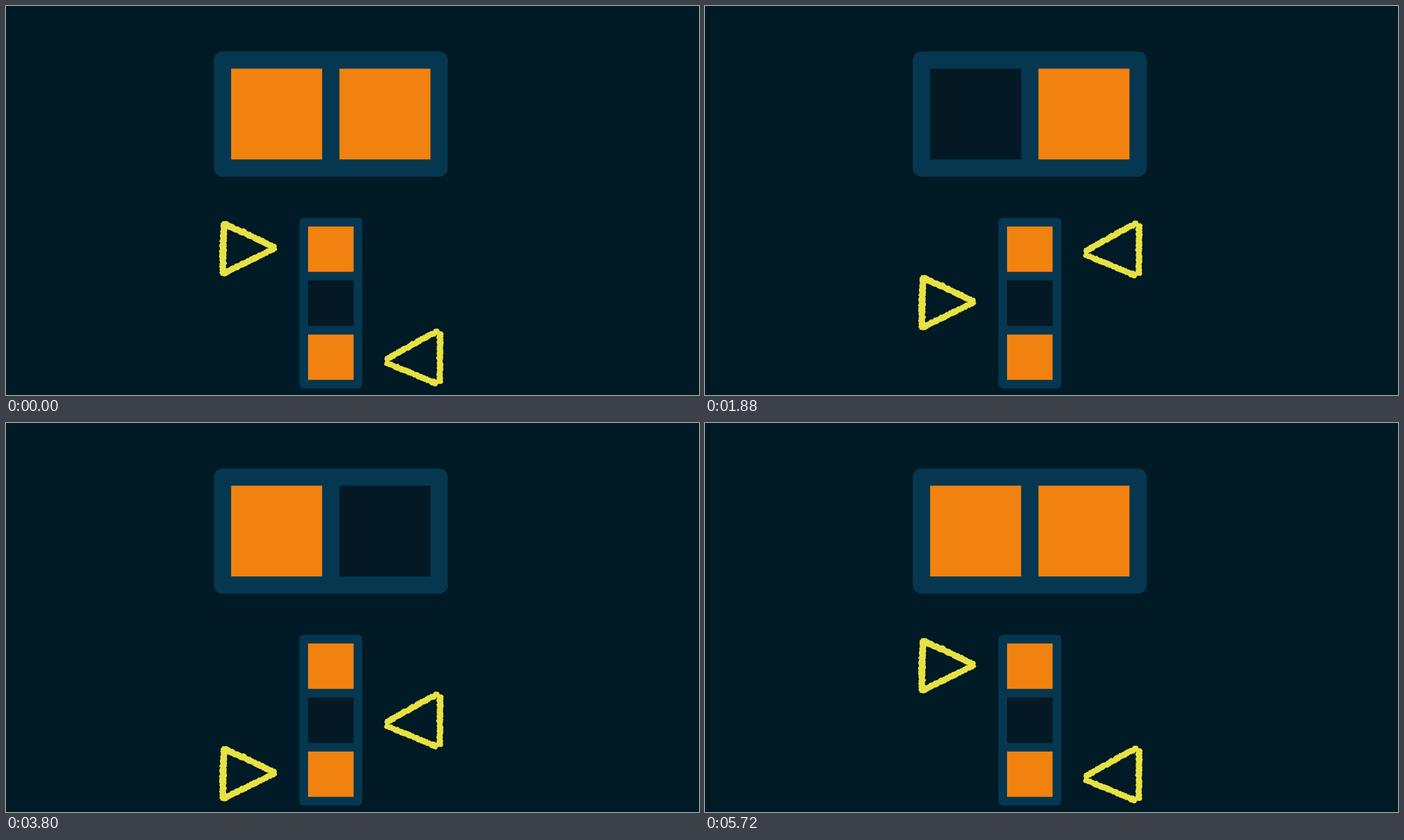
Animation, 998 px wide and 561 px high, one loop 5.76 s. Source, as an HTML page:

```html
<!DOCTYPE html>
<html lang="en">
<head>
<meta charset="utf-8">
<title>Sliding pointers</title>
<style>
  html, body { margin: 0; width: 100%; height: 100%; overflow: hidden; background: #001a26; }
  svg { display: block; width: 998px; height: 561px; }
  .panel { fill: #053750; }
  .on { fill: #f1820f; }
  .off { fill: #041924; }
  .chalk { fill: #e8e143; }
</style>
</head>
<body>
<svg viewBox="0 0 998 561">
  <rect class="panel" x="299.3" y="65.5" width="337" height="180.7" rx="12.5"/>
  <rect id="cellA" x="324.2" y="90.4" width="131.1" height="130.9"/>
  <rect id="cellB" x="480.2" y="90.4" width="131.1" height="130.9"/>

  <rect class="panel" x="422.5" y="305.5" width="90.6" height="246.2" rx="6.2"/>
  <rect class="on" x="435" y="318" width="65.6" height="65.4"/>
  <rect class="off" x="435" y="395.9" width="65.6" height="65.4"/>
  <rect class="on" x="435" y="473.8" width="65.6" height="65.4"/>

  <g id="left" class="chalk"></g>
  <g id="right" class="chalk"></g>
</svg>
<script>
const $ = id => document.getElementById(id);
const ROW = 77.9, PHASE = 1920, HOLD = 1440, STEP = 40, STEPS = 12;
const ON = [241, 130, 15], OFF = [4, 25, 36];
const bits = [1, 0, 1];

let seed = 7;
const rand = () => (seed = seed * 16807 % 2147483647) / 2147483647;

// Ragged chalk stroke from (x1,y1) to (x2,y2), bowed sideways.
function chalk(group, x1, y1, x2, y2, width, bow = 0) {
  const len = Math.hypot(x2 - x1, y2 - y1), n = Math.round(len / 1.8);
  const ux = (x2 - x1) / len, uy = (y2 - y1) / len;
  const sides = [[], []];
  for (let i = 0; i <= n; i++) {
    const t = i / n, end = Math.min(t, 1 - t) * len;
    const cap = end < 3 ? 0.55 + 0.45 * Math.sqrt(end / 3) : 1;
    const bend = bow * Math.sin(Math.PI * t);
    sides.forEach((side, k) => {
      const rough = (rand() - 0.5) * 1.4 + (rand() > 0.85 ? 0.7 : 0);
      const off = bend + (k ? -1 : 1) * (width / 2 * cap + rough);
      const along = t * len + (rand() - 0.5) * 1.2;
      side.push([x1 + ux * along - uy * off, y1 + uy * along + ux * off]);
    });
  }
  const points = [...sides[0], ...sides[1].reverse()];
  const path = document.createElementNS('http://www.w3.org/2000/svg', 'path');
  path.setAttribute('d', 'M' + points.map(p => p.map(v => v.toFixed(1)).join(' ')).join('L') + 'Z');
  group.append(path);
}

chalk($('left'), 314.6, 310.5, 312.6, 388.5, 9.6, 1);
chalk($('left'), 312, 313.4, 388.5, 349, 9, -0.6);
chalk($('left'), 311, 386.8, 389.5, 348.2, 8.8, 0);

chalk($('right'), 623.5, 311.8, 545.8, 355, 8.6, 0.4);
chalk($('right'), 625.3, 313.5, 624.6, 389.5, 8.8, 0);
chalk($('right'), 545.8, 358.2, 621.8, 389.6, 8.4, -0.3);

const sigmoid = x => 1 / (1 + Math.exp(-x));
const smooth = t => {
  const edge = sigmoid(-5);
  return Math.min(1, Math.max(0, (sigmoid(10 * (t - 0.5)) - edge) / (1 - 2 * edge)));
};

// Bezier ease that pulls back before a long return.
const windUp = t => {
  const u = 1 - t;
  return -7.5 * t ** 2 * u ** 4 - 10 * t ** 3 * u ** 3 + 15 * t ** 4 * u ** 2 + 6 * t ** 5 * u + t ** 6;
};

const mix = (a, b, t) => a + (b - a) * t;

function place(id, from, to, t) {
  const ease = to < from ? windUp : smooth;
  $(id).setAttribute('transform', `translate(0 ${mix(from, to, ease(t)) * ROW})`);
}

function paint(id, from, to, t) {
  const a = from ? ON : OFF, b = to ? ON : OFF;
  $(id).setAttribute('fill', `rgb(${a.map((v, i) => Math.round(mix(v, b[i], smooth(t))))})`);
}

function draw(ms) {
  const phase = Math.floor(ms / PHASE) % 3, next = (phase + 1) % 3;
  const local = ms % PHASE;
  const t = local < HOLD ? 0 : Math.min(1, (Math.floor((local - HOLD) / STEP) + 1) / STEPS);
  const rightFrom = (phase + 2) % 3, rightTo = phase;
  place('left', phase, next, t);
  place('right', rightFrom, rightTo, t);
  paint('cellA', bits[phase], bits[next], t);
  paint('cellB', bits[rightFrom], bits[rightTo], t);
}

const start = performance.now();
function tick() {
  draw(performance.now() - start);
  requestAnimationFrame(tick);
}
tick();
</script>
</body>
</html>
```
